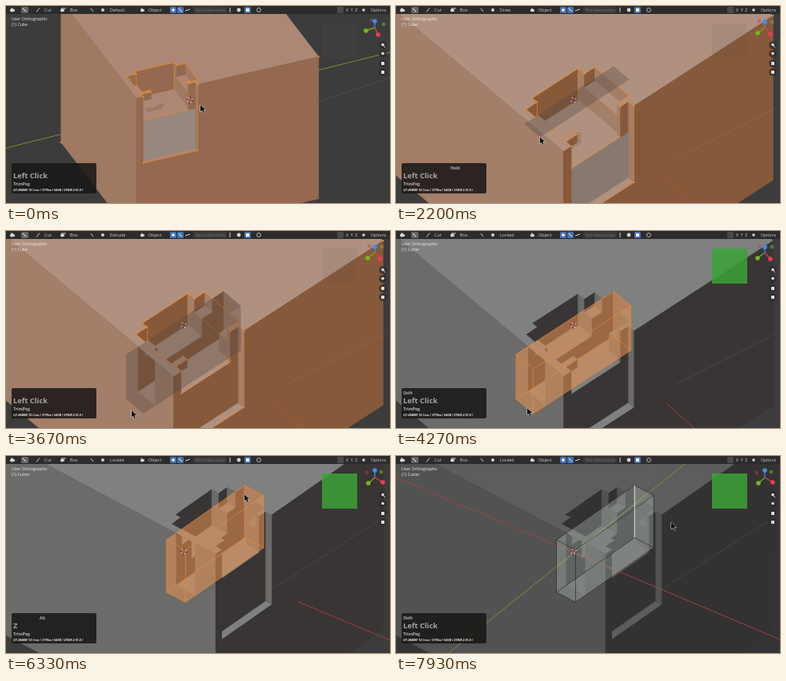
Animation of 480x247 px, one loop 8 s. Source, as an HTML page with a canvas:

```html
<!DOCTYPE html>
<html lang="en">
<head>
<meta charset="utf-8">
<title>Box cut demo</title>
<style>
  html, body { margin: 0; width: 100%; height: 100%; overflow: hidden; background: #3b3b3b; }
  canvas { display: block; width: 480px; height: 247px; }
</style>
</head>
<body>
<canvas id="stage" width="480" height="247"></canvas>
<script>
const g = document.getElementById('stage').getContext('2d');
const LOOP = 8000, SIZE = 262, TALL = 206;

// origin, x axis, y axis, z scale, 3D cursor, red axis, grid line, gizmo red / green / blue
const VIEWS = [
  [163, 116, .87, -.2, -.36, -.47, .865, 230, 118, 278, 192, 302, 232, 390, 120, 480, 90, 465, 36, 450, 31, 461, 19],
  [209.5, 182.5, 1, -.65, -1, -.84, 1, 222, 118, 337, 215, 372, 247, 350, 192, 480, 126, 468, 35, 452, 34, 461, 20],
  [262, 123, .8, -.56, -1.11, -.59, 1.17, 222, 120, 364, 182, 480, 231, 334, 166, 480, 72, 471, 33, 453, 34, 461, 18],
];

// top, left and right shades of the block
const SHADES = {
  near: [[173, 135, 117], [160, 121, 99], [148, 105, 79]],
  warm: [[176, 145, 127], [163, 126, 105], [134, 89, 58]],
  gray: [[126, 129, 127], [107, 108, 106], [56, 53, 52]],
  dim: [[92, 93, 92], [81, 82, 81], [52, 49, 50]],
};

// notch rim on the top face, from the front right to the front left
const RIM = [[88, 0], [88, 7], [78, 7], [78, 11], [93, 11], [93, 54], [80, 54], [80, 62],
  [23, 62], [23, 56], [9, 56], [9, 12], [24, 12], [24, 7], [10, 7], [10, 0]];
// along the slot: from x, to x, height of the material there
const STEPS = [[0, 9, 0], [9, 24, 17], [24, 80, 39], [80, 93, 17], [93, 107, 0]];
const SLOT = { x0: -15, x1: 107, y0: 23, y1: 44.5 };

const POINTER = [[0, 243, 124], [200, 243, 124], [530, 261, 132], [930, 264, 90], [1200, 266, 77],
  [1330, 273, 78], [1470, 273, 78], [2270, 171, 172], [2330, 171, 172], [3130, 163, 214],
  [3670, 157, 225], [4000, 162, 222], [4270, 164, 222], [5070, 235, 130], [5930, 298, 48],
  [7470, 298, 48], [7930, 344, 83]];
const CAMERA = [[0, 0], [200, 0], [530, 1], [4270, 1], [5070, 1.85], [5900, 2]];
const CORNER = [[1470, 107, 44.5], [2270, -15, 23]];
const DEPTH = [[2330, 0], [3500, 56]];

// time, modifier, its x, label
const KEYS = [[0, '', 0, 'Left Click'], [400, 'x2', 84, 'Wheel ↑'], [1470, 'Hold', 68, 'Left Click'],
  [2330, '', 0, 'Left Click'], [4070, 'Shift', 9, 'Left Click'], [6270, 'Alt', 42, 'Z'],
  [6900, 'Shift', 9, 'Left Click']];
const MODES = [[0, 'Default'], [1470, 'Draw'], [2330, 'Extrude'], [4070, 'Locked']];

const mix = (a, b, k) => a.map((v, i) => v + (b[i] - v) * k);
const rgb = c => `rgb(${c.map(Math.round)})`;
const since = (list, t) => list.filter(e => e[0] <= t).pop();

function track(list, t) {
  const i = list.findIndex(e => e[0] > t);
  if (i < 0) return list[list.length - 1].slice(1);
  if (!i) return list[0].slice(1);
  const a = list[i - 1], b = list[i];
  return mix(a, b, (t - a[0]) / (b[0] - a[0])).slice(1);
}

let view;
const project = ([x, y, z = 0]) => [
  view[0] + x * view[2] + y * view[4],
  view[1] + x * view[3] + y * view[5] + z * view[6]];

const wallX = (x, y0, y1, z0, z1) => [[x, y0, z0], [x, y1, z0], [x, y1, z1], [x, y0, z1]];
const wallY = (y, x0, x1, z0, z1) => [[x0, y, z0], [x1, y, z0], [x1, y, z1], [x0, y, z1]];
const flat = (z, x0, x1, y0, y1) => [[x0, y0, z], [x1, y0, z], [x1, y1, z], [x0, y1, z]];

function trace(pts, close = true) {
  pts.map(project).forEach((p, i) => i ? g.lineTo(...p) : g.moveTo(...p));
  if (close) g.closePath();
}
function face(pts, color, seam = true) {
  g.beginPath();
  trace(pts);
  g.fillStyle = color;
  g.fill();
  if (seam) {
    g.strokeStyle = color;
    g.lineWidth = .4;
    g.stroke();
  }
}
function edge(pts, color, width = .8, close = false) {
  g.beginPath();
  trace(pts, close);
  g.strokeStyle = color;
  g.lineWidth = width;
  g.stroke();
}
function line(x0, y0, x1, y1, color, width = 1) {
  g.beginPath();
  g.moveTo(x0, y0);
  g.lineTo(x1, y1);
  g.strokeStyle = color;
  g.lineWidth = width;
  g.stroke();
}
function dot(x, y, r, color) {
  g.beginPath();
  g.arc(x, y, r, 0, 7);
  g.fillStyle = color;
  g.fill();
}
function box(x, y, w, h, color, r = 0) {
  g.beginPath();
  g.roundRect(x, y, w, h, r);
  g.fillStyle = color;
  g.fill();
}
function text(s, x, y, size, color, style = '') {
  g.font = `${style} ${size}px "Open Sans", sans-serif`;
  g.fillStyle = color;
  g.fillText(s, x, y);
}

// inner faces of the notch between the front and a given depth y
function notch(back, [T, L, R]) {
  if (back > 60) {
    face(wallY(62, 23, 80, 0, 39), R);
    face(wallX(80, 54, 62, 0, 39), L);
    face(wallY(54, 80, 93, 0, 17), R);
  }
  const y = Math.min(back, 54);
  face(wallX(93, 11, y, 0, 17), L);
  face(flat(17, 80, 93, 11, y), T);
  face(wallX(80, 8, y, 17, 39), L);
  face(flat(39, 10, 80, 7, back), T);
  if (back > 60) face(wallY(56, 9, 23, 0, 17), R);
  face(flat(17, 9, 24, 12, Math.min(back, 56)), T);
}

function slot(depth, [T, L, R]) {
  for (const [a, b, top] of STEPS) {
    if (depth <= top) continue;
    face(flat(depth, a, b, SLOT.y0, SLOT.y1), T);
    face(wallY(SLOT.y1, a, b, top, depth), R);
  }
  face(wallX(SLOT.x1, SLOT.y0, SLOT.y1, 0, depth), L);
}

function block(colors, panel, depth) {
  const [T, L, R] = colors;
  face(flat(0, 0, SIZE, 0, SIZE), T);
  face(wallX(0, 0, SIZE, 0, TALL), L);
  face(wallY(0, 0, SIZE, 0, TALL), R);

  g.save();
  g.beginPath();
  trace(RIM);
  trace(wallY(0, 88, 10, 0, 96));
  if (depth) {
    trace(wallX(0, SLOT.y0, SLOT.y1, 0, depth));
    trace(flat(0, 93, SLOT.x1, SLOT.y0, SLOT.y1));
  }
  g.clip();
  notch(62, colors);
  if (!depth) {
    // shape showing through the floor
    face([[25, 33, 39], [40, 33, 39], [50, 37, 39], [54, 33, 39], [46, 24, 39], [27, 24, 39]], 'rgba(90,70,55,.22)', false);
  } else {
    slot(depth, colors);
    notch(SLOT.y0, colors);
  }
  face(wallX(78, 7, 11, 0, 39), L);
  face(wallY(7, 78, 88, 0, 39), R);
  face(wallY(7, 10, 24, 0, 10), R);
  face(wallY(7, 10, 88, 39, 96), panel);
  face(flat(96, 10, 88, 0, 7), T);
  face(wallX(88, 0, 7, 0, 96), L);
  g.restore();
}

function selection() {
  const c = '#ef8a1d';
  edge(RIM.map(p => [...p, 0]), c);
  edge([[88, 0, 0], [88, 0, 96], [10, 0, 96]], c, .6);
  edge([[80, 62, 0], [80, 62, 39]], c, .6);
  edge([[23, 56, 0], [23, 56, 17]], c, .6);
  edge([[80, 54, 17], [80, 8, 39], [16, 8, 39]].slice(1), c, .6);
  edge([[80, 54, 17], [80, 11, 17]], c, .5);
  g.fillStyle = c;
  for (const p of [...RIM, [88, 0, 96], [10, 0, 96], [SIZE, 0], [0, SIZE, TALL]]) {
    const [x, y] = project(p);
    g.fillRect(x - .9, y - .9, 1.8, 1.8);
  }
}

function cutter(x0, y0, depth, fill, stroke) {
  const { x1, y1 } = SLOT;
  const bottom = flat(depth, x0, x1, y0, y1), top = flat(0, x0, x1, y0, y1);
  const faces = depth ? [bottom, wallY(y1, x0, x1, 0, depth), wallX(x1, y0, y1, 0, depth),
    wallX(x0, y0, y1, 0, depth), wallY(y0, x0, x1, 0, depth), top] : [top, top];
  faces.forEach(f => face(f, fill, false));
  if (!stroke) return;
  edge(top, stroke, .7, true);
  edge(bottom, stroke, .7, true);
  top.forEach((p, i) => edge([p, bottom[i]], stroke, .7));
}

function header(mode) {
  box(0, 0, 480, 10, '#2c2c2c');
  const pale = '#d2d2d2';
  [[5, 6], [68, 5], [168, 5]].forEach(([x, w]) => {
    box(x, 4, w, 3, pale, 1);
    box(x + 1, 2.5, w - 3, 5, pale, 1);
  });
  box(19, 1, 9, 8, '#656565', 1.5);
  line(21, 3, 25, 7, '#fff');
  line(38, 7.5, 42, 2.5, pale);
  line(70, 3, 75, 3, pale);
  text('Cut', 48, 7.3, 5.4, pale);
  text('Box', 80, 7.3, 5.4, pale);
  line(106, 3, 109, 7, pale);
  dot(121, 5, 2, pale);
  text(mode, 130, 7.3, 5.4, pale);
  text('Object', 178, 7.3, 5.4, pale);
  box(205, 1, 8, 8, '#4772b3', 1.5);
  dot(209, 5, 1.8, '#fff');
  box(214, 1, 8, 8, '#4772b3', 1.5);
  line(216, 3, 220, 7, '#fff');
  line(224, 6, 230, 4, pale);
  box(234, 1, 42, 8, '#3a3a3a', 1.5);
  text('Non Destructive', 237, 7, 4.9, '#777');
  line(280, 2, 280, 8, pale);
  dot(291, 5, 2.4, pale);
  box(298, 1, 8, 8, '#4772b3', 1.5);
  box(300, 3, 4, 4, '#fff');
  g.beginPath();
  g.arc(316, 5, 2.5, 0, 7);
  g.strokeStyle = pale;
  g.lineWidth = .8;
  g.stroke();
  box(414, 1, 8, 8, '#4a4a4a', 1);
  text('X  Y  Z', 425, 7.2, 5.2, pale);
  dot(447, 5, 1.8, pale);
  text('Options', 456, 7.3, 5.2, pale);
}

function overlay(t, gray) {
  const hub = [461, 27], [rx, ry, gx, gy, bx, by] = view.slice(17);
  box(395, 22, 44, 44, gray ? 'rgba(58,164,55,.85)' : 'rgba(95,85,78,.1)');
  line(...hub, rx, ry, '#e0384d', 1.4);
  line(...hub, gx, gy, '#72a816', 1.4);
  line(...hub, bx, by, '#3c82e0', 1.4);
  dot(922 - rx, 54 - ry, 2.4, 'rgba(200,60,75,.45)');
  dot(922 - gx, 54 - gy, 2.4, 'rgba(115,165,30,.6)');
  dot(rx, ry, 2.8, '#ef3b50');
  dot(gx, gy, 2.8, '#79b71c');
  dot(bx, by, 2.8, '#3f8cf0');

  [49, 60, 72, 83].forEach((y, i) => {
    dot(471, y, 4.8, 'rgba(45,45,45,.8)');
    if (i < 2) dot(471, y - .5, 1.8, '#ddd');
    else box(469, y - 2, 4, 4, '#ddd', .5);
  });
  line(472, 50, 474, 52, '#ddd');

  text('User Orthographic', 7, 18, 5.2, '#eee');
  text(gray ? '(1) Cutter' : '(1) Cube', 7, 25, 5.2, '#eee');

  const [, mod, modX, label] = since(KEYS, t);
  box(7, 197, 106, 38, 'rgba(26,23,22,.87)', 2);
  text(mod, modX, 204.5, 5, '#b5b5b5', 'bold');
  text(label, 9, 216, 9.3, '#a5a5a5', 'bold');
  text('TrimPeg', 9, 224.5, 5.2, '#b5b5b5', 'bold');
  text('Q7-20400V 12 Core / 3170vx / 64GB / 2TB/B 2.93.0 /', 9, 231.5, 3.7, '#eee', 'italic bold');
}

function target() {
  const [x, y] = view.slice(7);
  g.lineWidth = .9;
  for (let i = 0; i < 8; i++) {
    g.beginPath();
    g.arc(x, y, 3.2, i * Math.PI / 4, (i + 1) * Math.PI / 4);
    g.strokeStyle = i % 2 ? '#fff' : '#d8202c';
    g.stroke();
  }
  for (const [u, v] of [[1, 0], [-1, 0], [0, 1], [0, -1]])
    line(x + u * 2, y + v * 2, x + u * 5, y + v * 5, '#332a25', .7);
}

function arrow(x, y) {
  g.beginPath();
  [[0, 0], [0, 8.5], [2, 6.8], [3.5, 10], [5, 9.3], [3.6, 6.2], [6.2, 6]]
    .forEach(([u, v]) => g.lineTo(x + u, y + v));
  g.closePath();
  g.fillStyle = '#111';
  g.strokeStyle = '#eee';
  g.lineWidth = 1;
  g.stroke();
  g.fill();
}

function draw(t) {
  const at = track(CAMERA, t)[0], i = Math.min(1, Math.floor(at));
  view = mix(VIEWS[i], VIEWS[i + 1], at - i);
  const gray = t >= 4070, dim = t >= 6400, plain = t >= 6900;
  const depth = track(DEPTH, t)[0];
  const shades = dim ? SHADES.dim : gray ? SHADES.gray
    : SHADES.near.map((c, n) => mix(c, SHADES.warm[n], Math.min(1, at)));
  const colors = shades.map(rgb);

  g.fillStyle = dim ? '#343434' : '#3c3c3c';
  g.fillRect(0, 0, 480, 247);
  if (at < 1) line(0, 178, 480, 58, '#7d8a32');
  block(colors, t < 2330 ? rgb(mix([150, 136, 126], [136, 121, 112], Math.min(1, at))) : colors[2], depth);

  line(...view.slice(13, 17), 'rgba(255,255,255,.08)');
  if (dim) {
    line(0, 27, 480, 230, '#964840');
    line(66, 247, 361, 10, '#7d9434');
  } else {
    if (at < .5) g.setLineDash([2, 1.5]);
    line(...view.slice(9, 13), gray ? '#ad3445' : 'rgba(205,85,50,.65)');
    g.setLineDash([]);
  }
  if (!gray) selection();

  if (t >= 1470) {
    const [x, y] = track(CORNER, t);
    if (plain) {
      cutter(x, y, depth, 'rgba(215,225,220,.15)', 'rgba(25,25,25,.75)');
      if (t >= 7470) edge([[107, 44.5, 0], [107, 44.5, 56]], '#f4f4f4', 1);
    } else if (gray) cutter(x, y, depth, 'rgba(232,146,82,.33)', '#e88b35');
    else cutter(x, y, depth, 'rgba(82,72,64,.19)');
  }
  target();
  overlay(t, gray);
  header(since(MODES, t)[1]);
  arrow(...track(POINTER, t));
}

function tick() {
  draw(performance.now() % LOOP);
  requestAnimationFrame(tick);
}
tick();
</script>
</body>
</html>
```
